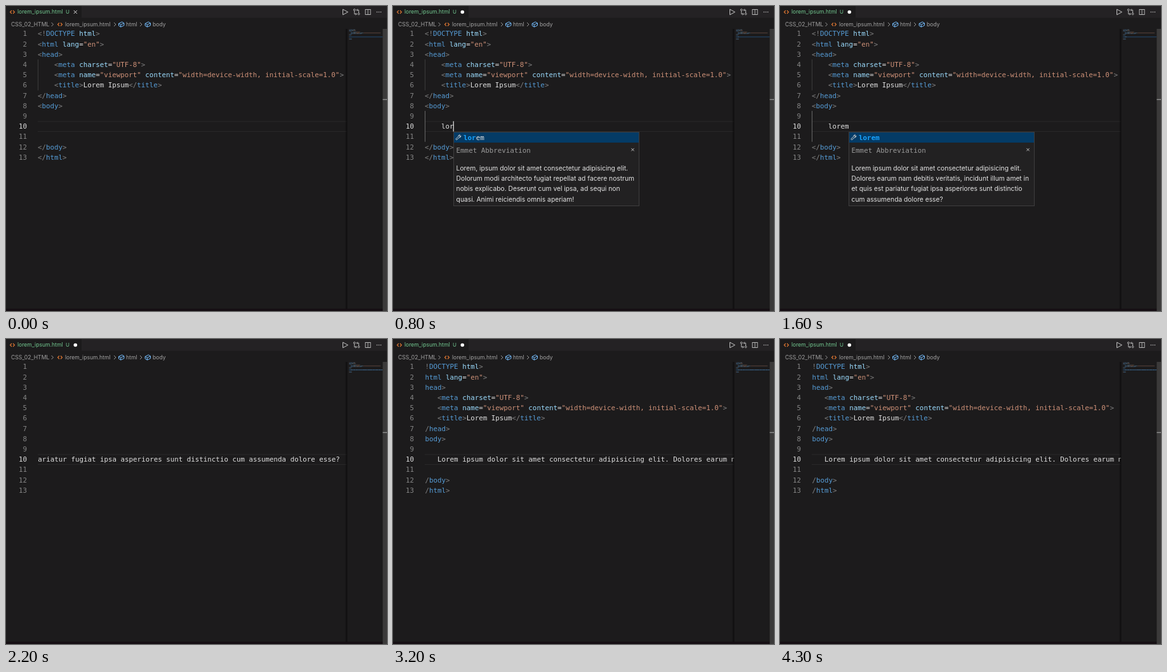
Write an HTML page with a canvas that moves like this. It is 600 by 480 pixels and loops after 4.4 s.

```html
<!DOCTYPE html>
<html lang="en">
<head>
<meta charset="UTF-8">
<title>Editor</title>
<style>
  html, body { margin: 0; width: 100%; height: 100%; overflow: hidden; background: #1c1b1c; }
  canvas { display: block; width: 600px; height: 480px; }
</style>
</head>
<body>
<canvas id="stage"></canvas>
<script>
const canvas = document.getElementById('stage');
const ctx = canvas.getContext('2d');
const ratio = window.devicePixelRatio || 1;
canvas.width = 600 * ratio;
canvas.height = 480 * ratio;
ctx.scale(ratio, ratio);

const LOOP = 4400;
const MONO = '10.82px "DejaVu Sans Mono", monospace';
const UI = '8.6px Inter, sans-serif';
const LEFT = 50, RIGHT = 537, CHAR = 6.514, ROW = 16.2, TOP = 35.5, BASE = 11.9;
const C = {
  bg: '#1c1b1c', bar: '#242224', bracket: '#808080', tag: '#569cd6', attr: '#9cdcfe',
  string: '#ce9178', text: '#e0e0e0', green: '#73c991', orange: '#e37933', dim: '#a3a3a3',
  blue: '#75beff', match: '#18a3ff'
};

const LINES = [
  '<!DOCTYPE html>', '<html lang="en">', '<head>',
  '    <meta charset="UTF-8">',
  '    <meta name="viewport" content="width=device-width, initial-scale=1.0">',
  '    <title>Lorem Ipsum</title>',
  '</head>', '<body>', '', '', '', '</body>', '</html>'
];
const TYPED = 9;

const LOREM = [
  'Lorem ipsum dolor sit amet consectetur adipisicing elit.',
  'Dolores earum nam debitis veritatis, incidunt illum amet in',
  'et quis est pariatur fugiat ipsa asperiores sunt distinctio',
  'cum assumenda dolore esse?'
];
const LOREM_LOR = [
  'Lorem, ipsum dolor sit amet consectetur adipisicing elit.',
  'Dolorum modi architecto fugiat repellat ad facere nostrum',
  'nobis explicabo. Deserunt cum vel ipsa, ad sequi non',
  'quasi. Animi reiciendis omnis aperiam!'
];
const LOREM_LO = [
  'Lorem ipsum dolor sit amet consectetur, adipisicing elit.',
  'Quaerat modi fugit repellendus earum nisi voluptatem',
  'tempora eligendi, quos minima rerum dolore placeat',
  'atque. Harum sequi omnis itaque ipsam facilis nemo',
  'debitis quasi?'
];
const ABBREVIATIONS = ['label', 'leg', 'legend', 'li', 'link'].concat(
  ['atom', 'css', 'favicon', 'im', 'import', 'manifest', 'mf'].map(s => 'link:' + s));

// [start time, text of the typed line]
const KEYS = [[0, ''], [200, '    '], [400, '    l'], [600, '    lo'], [700, '    lor'],
  [900, '    lore'], [1000, '    lorem'], [1700, '    ' + LOREM.join(' ')]];

const within = (t, from, to) => t >= from && t < to;

function rect(x, y, w, h, color) {
  ctx.fillStyle = color;
  ctx.fillRect(x, y, w, h);
}

function write(text, x, y, color, font = UI, align = 'left') {
  ctx.font = font;
  ctx.fillStyle = color;
  ctx.textAlign = align;
  ctx.fillText(text, x, y);
}

function stroke(color, width, ...paths) {
  ctx.strokeStyle = color;
  ctx.lineWidth = width;
  ctx.beginPath();
  for (const path of paths) {
    path.forEach(([x, y], i) => i ? ctx.lineTo(x, y) : ctx.moveTo(x, y));
  }
  ctx.stroke();
}

function ring(x, y, r, color) {
  ctx.strokeStyle = color;
  ctx.beginPath();
  ctx.arc(x, y, r, 0, Math.PI * 2);
  ctx.stroke();
}

function disc(x, y, r, color) {
  ctx.fillStyle = color;
  ctx.beginPath();
  ctx.arc(x, y, r, 0, Math.PI * 2);
  ctx.fill();
}

function cross(x, y, r, color) {
  stroke(color, 1, [[x - r, y - r], [x + r, y + r]], [[x + r, y - r], [x - r, y + r]]);
}

function codeIcon(x, y) {
  stroke(C.orange, 1.1, [[x - 1, y - 2.5], [x - 3.5, y], [x - 1, y + 2.5]],
    [[x + 1, y - 2.5], [x + 3.5, y], [x + 1, y + 2.5]]);
}

function cubeIcon(x, y) {
  stroke(C.blue, 1,
    [[x - 4.2, y - 1.4], [x + 1, y - 4], [x + 4.2, y - 2], [x + 4.2, y + 1.6], [x - 1, y + 4],
      [x - 4.2, y + 2], [x - 4.2, y - 1.4], [x - 1, y + 0.4], [x + 4.2, y - 2]],
    [[x - 1, y + 0.4], [x - 1, y + 4]]);
}

function chevron(x, y) {
  stroke(C.dim, 0.9, [[x - 1.5, y - 3], [x + 1.5, y], [x - 1.5, y + 3]]);
}

function wrench(x, y) {
  stroke('#d0d0d0', 1,
    [[x + 2.6, y - 4], [x + 0.6, y - 3.2], [x - 0.2, y - 1], [x - 4, y + 2.6], [x - 2.6, y + 4.2],
      [x + 1.2, y + 0.4], [x + 3.4, y - 0.2], [x + 4.2, y - 2.4], [x + 2, y - 1.4], [x + 1.4, y - 2.2],
      [x + 2.6, y - 4]]);
}

function tokens(line) {
  let inTag = false, named = false;
  return [...line.matchAll(/"[^"]*"|<[!\/]?|>|=|[^\s<>="]+/g)].map(match => {
    const text = match[0];
    let color = C.text;
    if (text[0] === '<') {
      inTag = true;
      named = false;
      color = C.bracket;
    } else if (text === '>') {
      inTag = false;
      color = C.bracket;
    } else if (text[0] === '"') {
      color = C.string;
    } else if (inTag && text !== '=') {
      color = named ? C.attr : C.tag;
      named = true;
    }
    return { text, col: match.index, color };
  });
}

function header(dirty) {
  rect(0, 0, 600, 18.5, C.bar);
  rect(0, 0, 119, 18.5, C.bg);
  codeIcon(10, 9.5);
  write('lorem_ipsum.html', 18, 12.4, C.green);
  write('U', 94, 12.2, C.green, '8px Inter, sans-serif');
  if (dirty) disc(109.3, 9.5, 2.8, '#ffffff');
  else cross(109.3, 9.5, 2.6, '#e0e0e0');

  const icon = '#c5c5c5';
  stroke(icon, 1, [[530.5, 5.2], [538.5, 9.5], [530.5, 13.8], [530.5, 5.2]]);
  stroke(icon, 0.9, [[548.7, 7.5], [548.7, 12.7], [552, 12.7]], [[550.5, 11], [552.2, 12.7], [550.5, 14.4]],
    [[555.5, 11], [555.5, 6.3], [552.3, 6.3]], [[553.8, 4.6], [552.1, 6.3], [553.8, 8]]);
  ring(548.7, 6.1, 1.4, icon);
  ring(555.5, 12.4, 1.4, icon);
  ctx.strokeRect(566, 5.5, 8, 8);
  stroke(icon, 0.9, [[570, 5.5], [570, 13.5]]);
  for (let i = -1; i < 2; i++) disc(587.3 + i * 3, 9.5, 0.8, icon);

  const base = 32;
  write('CSS_02_HTML', 8, base, C.dim);
  chevron(73, 29);
  codeIcon(85, 29);
  write('lorem_ipsum.html', 93, base, C.dim);
  chevron(171.5, 29);
  cubeIcon(181.7, 29);
  write('html', 189, base, C.dim);
  chevron(212.5, 29);
  cubeIcon(223.3, 29);
  write('body', 231, base, C.dim);
}

function guide(x, first, last, color) {
  rect(x, TOP + first * ROW, 0.9, (last - first + 1) * ROW, color);
}

function editor(lines, scroll, caret) {
  const rowTop = TOP + TYPED * ROW;
  lines.forEach((line, i) =>
    write(String(i + 1), 33, TOP + i * ROW + BASE, i === TYPED ? '#dedede' : '#858585', MONO, 'right'));
  rect(LEFT, rowTop, RIGHT - LEFT, 1, '#292829');
  rect(LEFT, rowTop + ROW - 0.5, RIGHT - LEFT, 1, '#292829');

  ctx.save();
  ctx.beginPath();
  ctx.rect(LEFT, 34, RIGHT - LEFT, 446);
  ctx.clip();
  const x0 = LEFT - scroll;
  guide(x0, 3, 5, '#404040');
  if (lines[TYPED]) guide(x0, 8, 10, '#707070');
  lines.forEach((line, i) => {
    for (const { text, col, color } of tokens(line)) {
      write(text, x0 + col * CHAR, TOP + i * ROW + BASE, color, MONO);
    }
  });
  if (caret) rect(x0 + lines[TYPED].length * CHAR - 1, rowTop, 1.3, ROW, '#d8d8d8');
  ctx.restore();
}

function minimap(lines) {
  const shade = ctx.createLinearGradient(533.5, 0, 538, 0);
  shade.addColorStop(0, 'rgba(0,0,0,0)');
  shade.addColorStop(0.75, 'rgba(0,0,0,.5)');
  shade.addColorStop(1, 'rgba(0,0,0,0)');
  rect(533.5, 36, 4.5, 444, shade);

  const top = 36.8, step = 1.27;
  rect(540, top + TYPED * step - 0.2, 53, 1.2, '#20405f');
  ctx.save();
  ctx.beginPath();
  ctx.rect(538, 34, 55, 30);
  ctx.clip();
  ctx.globalAlpha = 0.42;
  lines.forEach((line, i) => {
    for (const { text, col, color } of tokens(line)) {
      rect(540 + col * 0.68, top + i * step, text.length * 0.68, 0.8, color === C.text ? '#7fa9cc' : color);
    }
  });
  ctx.restore();

  rect(0, 476.5, 600, 3.5, '#150e13');
  rect(593.3, 36, 6.7, 444, '#3b3a3a');
  rect(593.3, 146.5, 6.7, 1.5, '#8a8a8a');
}

function popup(caretX, items, typed, details) {
  const x = Math.floor(caretX) + 0.5, top = 198, width = 292;
  const split = top + items.length * ROW + 0.6;
  const bottom = Math.floor(split + 52 + (details.length - 1) * ROW) - 0.5;
  rect(x, top, width, bottom - top, '#222122');
  items.forEach((item, i) => {
    const y = top + i * ROW + 8.7;
    if (i === 0) rect(x, top, width, ROW + 0.8, '#043b66');
    wrench(x + 7.3, y);
    write(typed, x + 15.6, y + 3.9, C.match, 'bold ' + MONO);
    write(item.slice(typed.length), x + 15.6 + typed.length * CHAR, y + 3.9, '#e4e4e4', MONO);
  });
  if (items.length > 1) {
    rect(x + width - 7.5, top + 1, 7.5, 148, 'rgba(121,121,121,.4)');
    rect(x, split + 1, width, 0.9, '#3c3c3c');
  }
  write('Emmet Abbreviation', x + 4.1, split + 16.2, '#9a9a9a', MONO);
  cross(x + width - 10, split + 11.3, 2.2, '#c0c0c0');
  details.forEach((line, i) =>
    write(line, x + 4.1, split + 44.2 + i * ROW, '#e4e4e4', '10.28px Inter, sans-serif'));
  ctx.strokeStyle = '#3e3d3e';
  ctx.lineWidth = 1;
  ctx.strokeRect(x, top + 0.5, width, bottom - top - 0.5);
}

function scrollAt(t) {
  if (t < 1700) return 0;
  const p = Math.min(1, Math.max(0, (t - 2600) / 600));
  const end = 134 * CHAR - 0.3;
  return end + (6 - end) * p * p * (3 - 2 * p);
}

function draw(t) {
  const typed = KEYS.filter(([start]) => t >= start).pop()[1];
  const lines = LINES.map((line, i) => i === TYPED ? typed : line);
  const caret = within(t, 100, 1500) || within(t, 1700, 2200) || t >= 2700;

  rect(0, 0, 600, 480, C.bg);
  header(t >= 200);
  editor(lines, scrollAt(t), caret);
  minimap(lines);

  if (within(t, 500, 1700)) {
    const word = typed.trim();
    const x = LEFT + typed.length * CHAR;
    if (word === 'l') popup(x, ABBREVIATIONS, word, ['<label for="|">|</label>']);
    else popup(x, ['lorem'], word, word === 'lo' ? LOREM_LO : word === 'lorem' ? LOREM : LOREM_LOR);
  }
}

const begin = performance.now();
function tick() {
  const t = (performance.now() - begin) % LOOP;
  draw(Math.floor(t / 100) * 100);
  requestAnimationFrame(tick);
}
tick();
</script>
</body>
</html>
```
